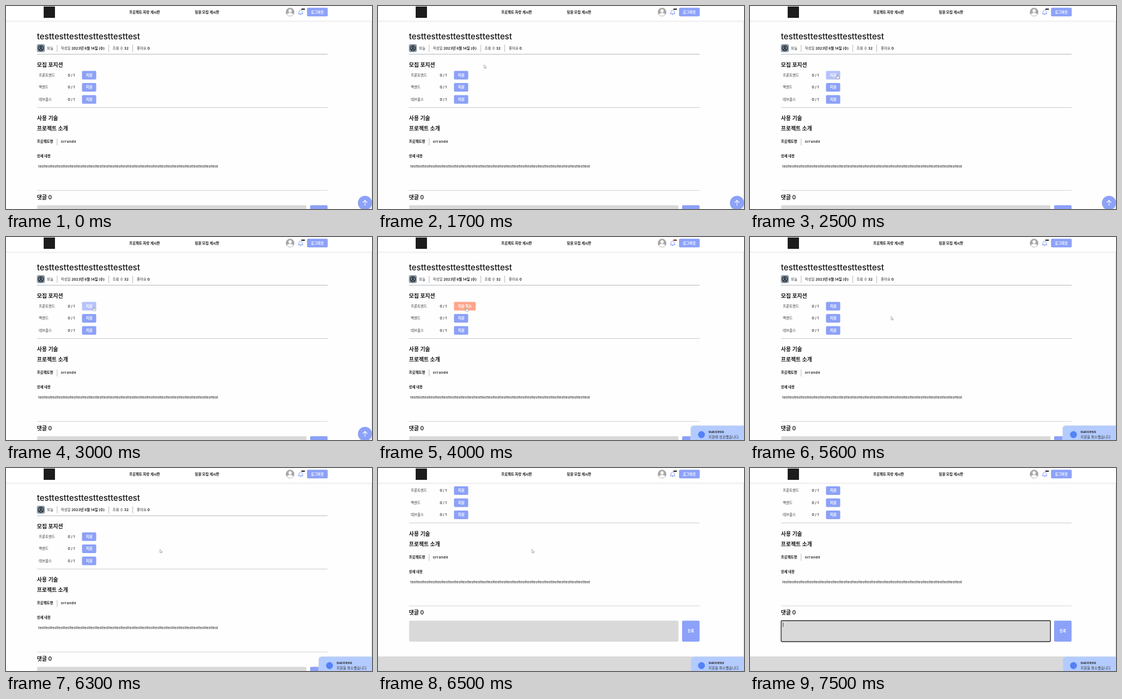
Write an HTML page that moves like this. It is 680x377 px and loops after 8 s.

```html
<!DOCTYPE html>
<html lang="ko">
<head>
<meta charset="utf-8">
<title>팀원 모집</title>
<style>
html, body { margin: 0; width: 100%; height: 100%; overflow: hidden; background: #fefefe; }
svg { display: block; width: 680px; height: 377px; }
text { font: 500 6.5px Inter, "Noto Sans CJK KR", "Noto Sans CJK", sans-serif; fill: #161616; }
.r { font-weight: 400; fill: #333; }
.b { font-weight: 600; fill: #161616; }
.h { font-size: 10px; font-weight: 600; }
.w { font-weight: 600; fill: #fff; text-anchor: middle; }
.btn { fill: #8ca1f8; }
.sep { stroke: #b4b4b4; }
.icon { fill: none; stroke-linecap: round; stroke-linejoin: round; }
</style>
</head>
<body>
<svg viewBox="0 0 680 377">
  <rect width="680" height="377" fill="#fefefe"/>

  <g id="page">
    <text id="title" x="57.5" y="61.6" style="font-size:15.25px"></text>
    <rect x="57.5" y="71" width="14.5" height="14.5" rx="3" fill="#8494a2"/>
    <g class="icon" stroke="#10161c" stroke-width="1.2">
      <circle cx="64.8" cy="78.3" r="4.8"/>
      <circle cx="64.8" cy="76.9" r="1.6"/>
      <path d="M61.7 81.5q3.1-3.2 6.2 0"/>
    </g>
    <text class="r" x="76" y="81">보늘</text>
    <text class="r" x="102" y="81">작성일 <tspan class="b">2023년 6월 14일 (수)</tspan></text>
    <text class="r" x="198" y="81">조회 수 <tspan class="b">32</tspan></text>
    <text class="r" x="243" y="81">좋아요 <tspan class="b">0</tspan></text>
    <path class="sep" d="M95 72v13M191 72v13M235.5 72v13M95 246v13"/>
    <path d="M57.5 89.5h540" stroke="#b0b7bb"/>
    <path d="M57.5 188.5h540" stroke="#c4c7c9"/>
    <path d="M57.5 342.5h540" stroke="#d2d2d2"/>

    <text class="h" x="57.5" y="113">모집 포지션</text>
    <g id="rows"></g>

    <text class="h" x="57.5" y="212">사용 기술</text>
    <text class="h" x="57.5" y="231">프로젝트 소개</text>
    <text class="b" x="57.5" y="254.3">프로젝트명</text>
    <text class="b" x="102" y="254.3" letter-spacing=".6">orrande</text>
    <text class="b" x="57.5" y="281">상세 내용</text>
    <text id="body" x="60" y="300.3" style="font-size:6.81px;font-weight:400"></text>

    <text class="h" x="57.5" y="358.8">댓글 0</text>
    <rect id="field" x="57.8" y="370" width="500.4" height="39" rx="2" fill="#d9d9d9" stroke-width="1.3"/>
    <path id="caret" d="M61.5 373.5v8" stroke="#222" stroke-width=".8"/>
    <rect class="btn" x="565" y="370" width="32.5" height="39" rx="2"/>
    <text class="w" x="581.2" y="391.5">등록</text>
    <rect y="436.5" width="680" height="60" fill="#d9d9d9"/>
  </g>

  <rect width="680" height="28" fill="#fff"/>
  <path d="M0 28h680" stroke="#e2e2e2"/>
  <path d="M0 29.2h680" stroke="#f4f4f4"/>
  <rect x="70" y="1" width="21" height="21" fill="#1c1c1c"/>
  <text class="b" x="229" y="13.6">프로젝트 자랑 게시판</text>
  <text class="b" x="351" y="13.6">팀원 모집 게시판</text>
  <circle cx="527.8" cy="11.3" r="8" fill="#a8a8a8"/>
  <circle cx="527.8" cy="9" r="2.9" fill="#fff"/>
  <path d="M522.2 16.4c0-5 11.2-5 11.2 0q-5.6 4-11.2 0z" fill="#fff"/>
  <path class="icon" stroke="#7893f5" d="M543.2 14.2q1.3-1 1.3-3.6c0-4 5.8-4 5.8 0q0 2.6 1.3 3.6zM546.3 16q1.1 1 2.2 0"/>
  <rect id="badge" x="548.7" y="4.7" width="6.8" height="2.4" rx="1"/>
  <rect class="btn" x="559.3" y="3.3" width="38.4" height="16" rx="2"/>
  <text class="w" x="578.5" y="13.6">로그아웃</text>

  <path d="M679.5 29v348" stroke="#dedede"/>
  <g id="up">
    <circle cx="667" cy="366.6" r="13.5" fill="#d5d9e6"/>
    <circle class="btn" cx="667" cy="365.5" r="13"/>
    <path class="icon" stroke="#fff" stroke-width="1.1" d="M667 370.5v-9.5m-4 4l4-4 4 4"/>
  </g>

  <g id="toast">
    <rect x="580.5" y="349.7" width="110" height="40" rx="6" fill="#d4dbea"/>
    <rect x="581.5" y="350.7" width="110" height="40" rx="5.5" fill="#b3cbff"/>
    <circle cx="601" cy="367" r="6.4" fill="#5482f6"/>
    <text class="b" x="614" y="364.2" style="font-size:7.2px">success</text>
    <text id="msg" class="r" x="614" y="374.4"></text>
  </g>

  <g id="mouse" fill="#fff" stroke="#777" stroke-width=".6" stroke-linejoin="round">
    <path id="arrow" d="M0 0v6.4l1.5-1.3 1 2.2 1.1-.5-1-2.1h2z"/>
    <path id="hand" d="M-.7 .3q.7-.8 1.4 0v2.5l2.6 .7q.7 .3 .5 1.2l-.7 2.5h-3.6l-2-2.8q.3-.9 1.8 .2z"/>
  </g>
</svg>
<script>
const $ = id => document.getElementById(id);
const show = (id, on) => $(id).style.display = on ? '' : 'none';
const fill = (id, colour) => $(id).setAttribute('fill', colour);
const move = (id, x, y) => $(id).setAttribute('transform', `translate(${x} ${y})`);
const mix = (a, b, k) => `rgb(${a.map((v, i) => Math.round(v + (b[i] - v) * k))})`;

$('title').textContent = 'test'.repeat(7);
$('body').textContent = 'test'.repeat(28);
$('rows').innerHTML = ['프론트엔드', '백엔드', '데브옵스'].map((name, i) => `
  <g transform="translate(0 ${i * 22.5})">
    <text class="r" x="61" y="130.8">${name}</text>
    <text x="115" y="130.8">0 / 1</text>
    <rect id="apply${i}" x="141.2" y="120.4" width="26.4" height="16" rx="2" fill="#8ca1f8"/>
    <text id="label${i}" class="w" x="154.4" y="130.8">지원</text>
  </g>`).join('');

// Interpolates rows of [time, value, ...] with a soft start and stop.
function track(keys, t) {
  let i = 0;
  while (i < keys.length - 2 && t >= keys[i + 1][0]) i++;
  const [a, b] = [keys[i], keys[i + 1]];
  const k = Math.min(1, Math.max(0, (t - a[0]) / (b[0] - a[0])));
  const e = k * k * (3 - 2 * k);
  return a.slice(1).map((v, j) => v + (b[j + 1] - v) * e);
}

const path = [
  [300, 640, -10], [1200, 400, 70], [1300, 400, 70], [1700, 197, 109], [1900, 194, 113],
  [2100, 194, 113], [2500, 162, 128], [2900, 163, 130], [4000, 164, 131], [4300, 166, 133],
  [5100, 166, 133], [5800, 286, 151], [6800, 286, 151], [7300, 120, 297]
];
const scroll = [[6200, 0], [6300, -.8], [6400, -46], [6500, -86.5]];

function draw(t) {
  const [x, y] = track(path, t);
  const applied = t >= 3700 && t < 5200;
  const over = y > 120 && y < 137 && x > 141 && x < (applied ? 181 : 167);
  const focus = t >= 7300;

  move('mouse', x, y);
  show('mouse', t >= 400 && t < 7200);
  show('arrow', !over);
  show('hand', over);

  move('page', 0, track(scroll, t)[0]);
  $('field').setAttribute('stroke', focus ? '#222' : 'none');
  show('caret', focus);

  const fade = Math.min(1, Math.max(0, (t - 4000) / 300));
  fill('apply0', applied ? mix([255, 165, 138], [252, 90, 36], fade) : over ? '#b6c3fb' : '#8ca1f8');
  $('apply0').setAttribute('width', applied ? 40.4 : 26.4);
  $('label0').setAttribute('x', applied ? 161.4 : 154.4);
  $('label0').textContent = applied ? '지원 취소' : '지원';
  fill('badge', applied && t >= 4000 ? mix([130, 45, 35], [228, 70, 55], fade) : '#222');

  show('toast', t >= 3700);
  show('up', t < 3800);
  move('toast', t < 3800 ? 50 : 0, 0);
  $('msg').textContent = t < 5200 ? '지원에 성공했습니다' : '지원을 취소했습니다';
}

function frame() {
  draw(Math.floor(performance.now() % 8000 / 100) * 100);
  requestAnimationFrame(frame);
}
frame();
</script>
</body>
</html>
```
